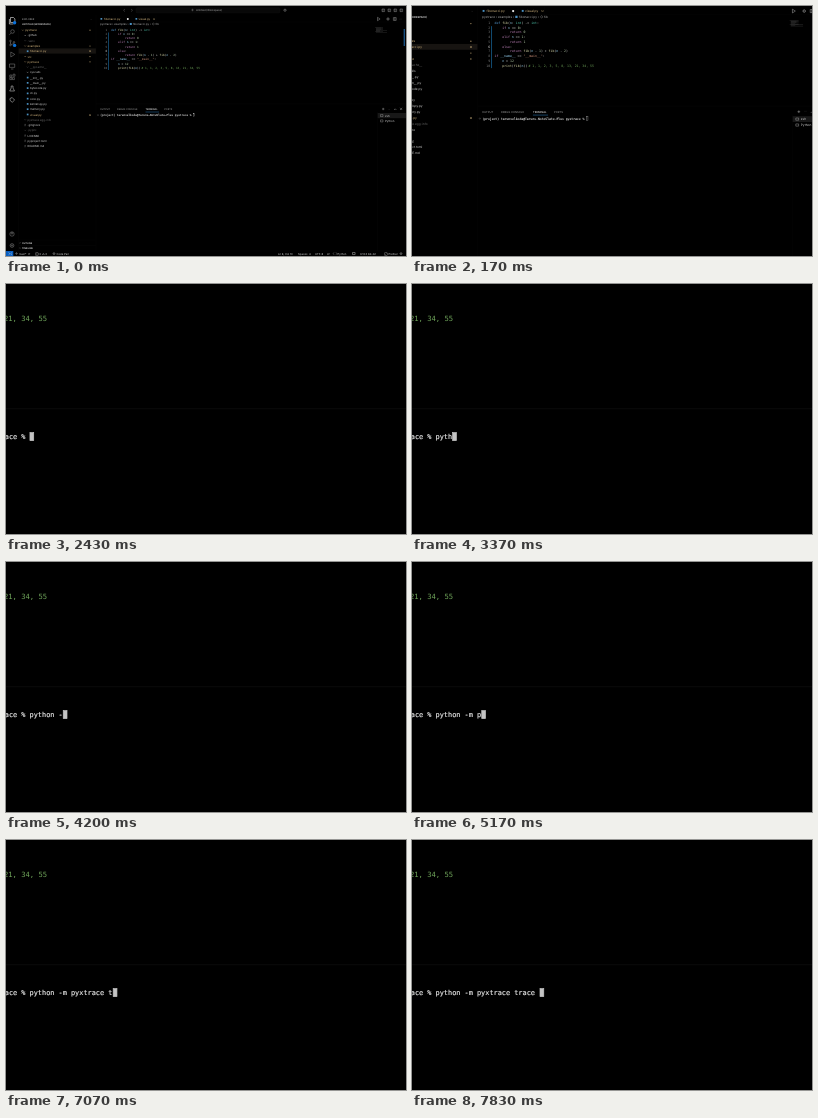
An HTML page that plays this animation: 400x250 px, repeating every 8000 ms.

```html
<!DOCTYPE html>
<html lang="en">
<head>
<meta charset="utf-8">
<title>Editor zoom and typing</title>
<style>
html, body { margin: 0; width: 100%; height: 100%; overflow: hidden; background: #000; }
svg { display: block; width: 100vw; height: 100vh; }
text { font-family: Inter, "Open Sans", sans-serif; text-rendering: geometricPrecision; }
.code, .term { font-family: "DejaVu Sans Mono", monospace; }
.code { font-size: 2.876px; }
.term { font-size: 2.766px; stroke: #ddd; stroke-width: .07px; }
</style>
</head>
<body>
<svg viewBox="0 0 400 250"><g id="scene"></g></svg>
<script>
const LOOP = 8000;
const ZOOM = { start: 50, end: 400, scale: 2.5, x: -444, y: -120 };
const FOCUS = 2430;
const COMMAND = 'python -m pyxtrace trace ';
const KEYS = [2970, 3100, 3230, 3370, 3430, 3530, 3700, 4170, 4370, 4800, 5030, 5530, 5700,
  5900, 6000, 6170, 6400, 6500, 6700, 7070, 7270, 7470, 7630, 7730, 7830];
const CELL = 1.665, PROMPT_END = 187.04;
const DIM = '#888', TEXT = '#d0d0d0', BLUE = '#2f8fd8', GOLD = '#d6b880', LINE = '#0b0b0b';

const scene = document.getElementById('scene');
const parts = [];
const add = s => parts.push(s);
const text = (x, y, s, fill = TEXT, size = 2.8, more = '') =>
  add(`<text x="${x}" y="${y}" fill="${fill}" font-size="${size}" ${more}>${s}</text>`);
const rect = (x, y, w, h, fill, more = '') =>
  add(`<rect x="${x}" y="${y}" width="${w}" height="${h}" fill="${fill}" ${more}/>`);
const path = (d, stroke = DIM, width = .5) =>
  add(`<path d="${d}" fill="none" stroke="${stroke}" stroke-width="${width}"/>`);
const dot = (x, y, r, fill, more = '') =>
  add(`<circle cx="${x}" cy="${y}" r="${r}" fill="${fill}" ${more}/>`);
const ring = (x, y, r, stroke = DIM) => dot(x, y, r, 'none', `stroke="${stroke}" stroke-width=".5"`);
const square = (x, y, fill = '#4a8fc0') => rect(x, y, 1.7, 1.7, fill);

function titleBar() {
  rect(130, 1.8, 144, 5, '#080808', `rx="1" stroke="#1c1c1c" stroke-width=".25"`);
  text(203, 5.2, 'Untitled (Workspace)', '#aaa', 2.6, 'text-anchor="middle"');
  ring(186.5, 4, .7);
  path('M119 3l-1.5 1.3 1.5 1.3M125 3l1.5 1.3-1.5 1.3', DIM, .35);
  ring(279, 4.2, 1.1, '#aaa');
  [376, 382, 388, 394].forEach(x => path(`M${x} 3h2.6v2.6h-2.6zm1 0v2.6`, '#aaa', .4));
}

function activityBar() {
  path('M4.5 11.5h3l1.4 1.4v3.6h-4.4zM3.4 13v5h4', '#eee', .6);
  dot(8.6, 16.8, 1.7, '#0a70d8');
  ring(6.5, 25.5, 1.8);
  path('M5.2 27l-1.8 1.8');
  ring(4.5, 35, .8); ring(4.5, 39, .8); ring(8, 36.3, .8);
  path('M4.5 35.8v2.4M8 37c0 1.2-2 1-3 1.5');
  dot(8.6, 39.4, 1.7, '#0a70d8');
  path('M4.8 46l4 2.4-4 2.6z');
  path('M3.5 58h5.2v3.4H3.5zM5 63h2.4');
  path('M3.8 69h2v2h-2zM3.8 71.6h2v2h-2zM6.4 71.6h2v2h-2zM7 68.2h2v2h-2z');
  path('M5.2 80h1.8v2l1.5 3H3.7l1.5-3z', '#bbb', .6);
  path('M4 92.5l2.2-1 2.4 2.6-2.4 2.2-2.2-2z', '#bbb', .6);
  ring(6, 228, 2.2); ring(6, 227.3, .8);
  ring(6, 239.5, 1.9); ring(6, 239.5, .7);
  path('M12.5 9V245', LINE, .3);
}

function explorer() {
  text(16, 14, 'EXPLORER', '#aaa', 2.4);
  text(84, 14, '···', '#aaa', 2.4);
  text(16, 19.4, 'UNTITLED (WORKSPACE)', '#ddd', 2.35, 'font-weight="600"');
  rect(12.7, 42.4, 77.3, 5.2, '#171411');
  // depth, kind, name: d folder, p script, f other, x ignored; a capital kind is changed
  const rows = `0D pyxtrace|1d .github|1x .venv|1D examples|2P fibonacci.py|1D src|1D pyxtrace|2x __pycache__
|2d syscalls|2p __init__.py|2p __main__.py|2p bytecode.py|2p cli.py|2p core.py|2p kernelspy.py|2p memory.py
|2P visual.py|1x pyxtrace.egg-info|1f .gitignore|1x .pypirc|1f LICENSE|1f pyproject.toml|1f README.md`;
  rows.split('|').forEach((row, i) => {
    const [, depth, kind, name] = row.trim().match(/(\d)(\w) (.*)/);
    const k = kind.toLowerCase(), y = 24.2 + i * 5.27, x = 16 + depth * 2.4;
    const fill = k === 'x' ? '#666' : k !== kind ? GOLD : TEXT;
    if (k === 'p') square(x, y - .9);
    else if (k === 'f') path(`M${x} ${y - .7}h1.6M${x} ${y}h1.6M${x} ${y + .7}h1.2`, DIM, .3);
    else path(`M${x} ${y - .5}l.8 .9 .8-.9`, fill, .35);
    text(x + 3.2, y + 1, name, fill);
    if (kind === 'D') dot(84, y, .6, '#a08a60');
    if (kind === 'P') text(83, y + 1, 'M', GOLD, 2.4);
  });
  path('M12.5 234H90M12.5 239.5H90M90 9V245', LINE, .3);
  ['OUTLINE', 'TIMELINE'].forEach((s, i) => {
    path(`M13.7 ${236 + i * 5.3}l.7 .8-.7 .8`, DIM, .35);
    text(16, 237.8 + i * 5.3, s, '#ddd', 2.35, 'font-weight="600"');
  });
}

function paint(code) {
  const colours = ['#ce9178', '#569cd6', '#c586c0', '#b5cea8', '#dcdcaa', '#9cdcfe'];
  const token = /("[^"]*")|\b(def)\b|\b(if|elif|else|return)\b|\b(\d+)\b|\b(fib|print)\b|\b(n|__name__)\b|\b(int)\b/g;
  return code.replace(token, (m, ...groups) => {
    const i = groups.slice(0, 7).findIndex(g => g !== undefined);
    return `<tspan fill="${colours[i] || '#4ec9b0'}">${m}</tspan>`;
  });
}

function minimap() {
  [8, 5, 7, 5, 7, 4, 11, 8, 4, 11].forEach((w, i) =>
    rect(369 + (i % 7 ? 1 : 0), 21.3 + i * .55, w, .3, '#444'));
  rect(397.6, 23, 1.4, 17, '#174f80');
}

function editor() {
  path('M126 9V16M150 9V16M126 16H400', LINE, .3);
  square(94.5, 12);
  text(98, 14, 'fibonacci.py', GOLD);
  dot(121.8, 13, 1, '#eee');
  square(129.5, 12);
  text(132.5, 14, 'visual.py', GOLD);
  text(147, 14, 'M', '#a08a60', 2.4);
  path('M371.5 11.3l2.6 1.7-2.6 1.7z', '#bbb', .4);
  ring(382, 13, 1.1, '#bbb');
  path('M387.4 11.6h2.8v2.8h-2.8zm1.4 0v2.8', '#bbb', .4);
  text(393.5, 14, '···', '#bbb');
  text(94, 19.4, 'pyxtrace › examples › <tspan fill="#4a8fc0">■</tspan> fibonacci.py › ◇ fib', '#aaa');
  const lines = ['def fib(n: int) -> int:', '    if n == 0:', '        return 0', '    elif n == 1:',
    '        return 1', '    else:', '        return fib(n - 1) + fib(n - 2)',
    'if __name__ == "__main__":', '    n = 12', '    print(fib(n))'];
  lines.forEach((line, i) => {
    const y = 62.8 - (9 - i) * 4.25, body = line.trimStart();
    text(101.2, y, i + 1, i === 5 ? '#ddd' : '#777', 2.88, 'class="code" text-anchor="end"');
    text(105.1 + (line.length - body.length) * 1.734, y, paint(body), '#e0e0e0', 2.88, 'class="code"');
  });
  text(194, 62.8, '# 1, 1, 2, 3, 5, 8, 13, 21, 34, 55', '#6fa55a', 2.88, 'class="code" text-anchor="end"');
  rect(102.3, 26.5, .6, 37.5, '#1b6fa8');
  minimap();
}

function panel() {
  path('M90 97.9H400', LINE, .4);
  [[94, 'OUTPUT'], [111, 'DEBUG CONSOLE'], [139.5, 'TERMINAL', '#fff'], [158.3, 'PORTS']]
    .forEach(([x, s, fill = '#999']) => text(x, 104, s, fill, 2.4));
  path('M139.5 106H153', BLUE, .4);
  path('M376 103h2.4M377.2 101.8v2.4M388 104l1.2-1.2 1.2 1.2M394 101.8l2.2 2.2m0-2.2l-2.2 2.2', '#bbb', .4);
  text(382, 103.6, '···', '#bbb', 2.4);
  path('M371.5 106V245', LINE, .3);
  rect(371.7, 107, 28.3, 5.2, '#181818');
  [['zsh', 110.6], ['Python', 115.9]].forEach(([s, y]) => {
    path(`M374.5 ${y - 2}h2.5v2h-2.5z`, '#bbb', .35);
    text(379, y, s);
  });
  dot(92, 109.1, .6, 'none', 'stroke="#777" stroke-width=".3"');
  text(PROMPT_END - CELL, 110, '(project) tarunvelkoda@Taruns-NoteSlate-Plus pyxtrace %', '#eee', 2.766,
    'class="term" text-anchor="end"');
  add(`<text id="typed" class="term" x="${PROMPT_END}" y="110" fill="#eee"></text>`);
  add('<rect id="cursor" y="107.45" width="1.5" height="3.2" stroke="#c4c4c4" stroke-width=".28"/>');
}

function statusBar() {
  path('M0 245H400', LINE, .3);
  rect(0, 245, 7.3, 5, '#0a5fc0');
  path('M2.5 246.5l1.4 1.2-1.4 1.2M6 246.5l-1.4 1.2 1.4 1.2', '#eee', .35);
  ring(10.5, 247.5, .7, '#bbb');
  ring(48, 247.6, .9, '#bbb');
  [[13, 'main*'], [22, '⟳'], [29, '⊗ 0 △ 0'], [50.5, 'Code Pair'], [272, 'Ln 6, Col 10'], [292, 'Spaces: 4'],
   [309, 'UTF-8'], [321, 'LF'], [331.5, 'Python'], [354, '3.13.2 64-bit'], [378, '⊘ Prettier']]
    .forEach(([x, s]) => text(x, 248.5, s, TEXT, 2.7));
  path('M328 246.4l-.8 1.2.8 1.2m2-2.4l.8 1.2-.8 1.2', '#bbb', .35);
  path('M346.5 246.5h2.6v2h-2.6z', '#bbb', .5);
  ring(395, 247.6, .9, '#bbb');
}

[titleBar, activityBar, explorer, editor, panel, statusBar].forEach(draw => draw());
scene.innerHTML = parts.join('');
const typed = document.getElementById('typed');
const cursor = document.getElementById('cursor');

const easeInOut = u => u < .5 ? 16 * u ** 5 : 1 - 16 * (1 - u) ** 5;

function frame(now) {
  const t = now % LOOP;
  const u = Math.min(1, Math.max(0, (t - ZOOM.start) / (ZOOM.end - ZOOM.start)));
  const p = easeInOut(u);
  scene.setAttribute('transform',
    `translate(${ZOOM.x * p} ${ZOOM.y * p}) scale(${1 + (ZOOM.scale - 1) * p})`);
  const count = KEYS.filter(k => k <= t).length;
  typed.textContent = COMMAND.slice(0, count);
  cursor.setAttribute('x', PROMPT_END + .14 + count * CELL);
  cursor.setAttribute('fill', t < FOCUS ? 'none' : '#c4c4c4');
}

const origin = performance.now();
function tick() {
  frame(performance.now() - origin);
  requestAnimationFrame(tick);
}
tick();
</script>
</body>
</html>
```
